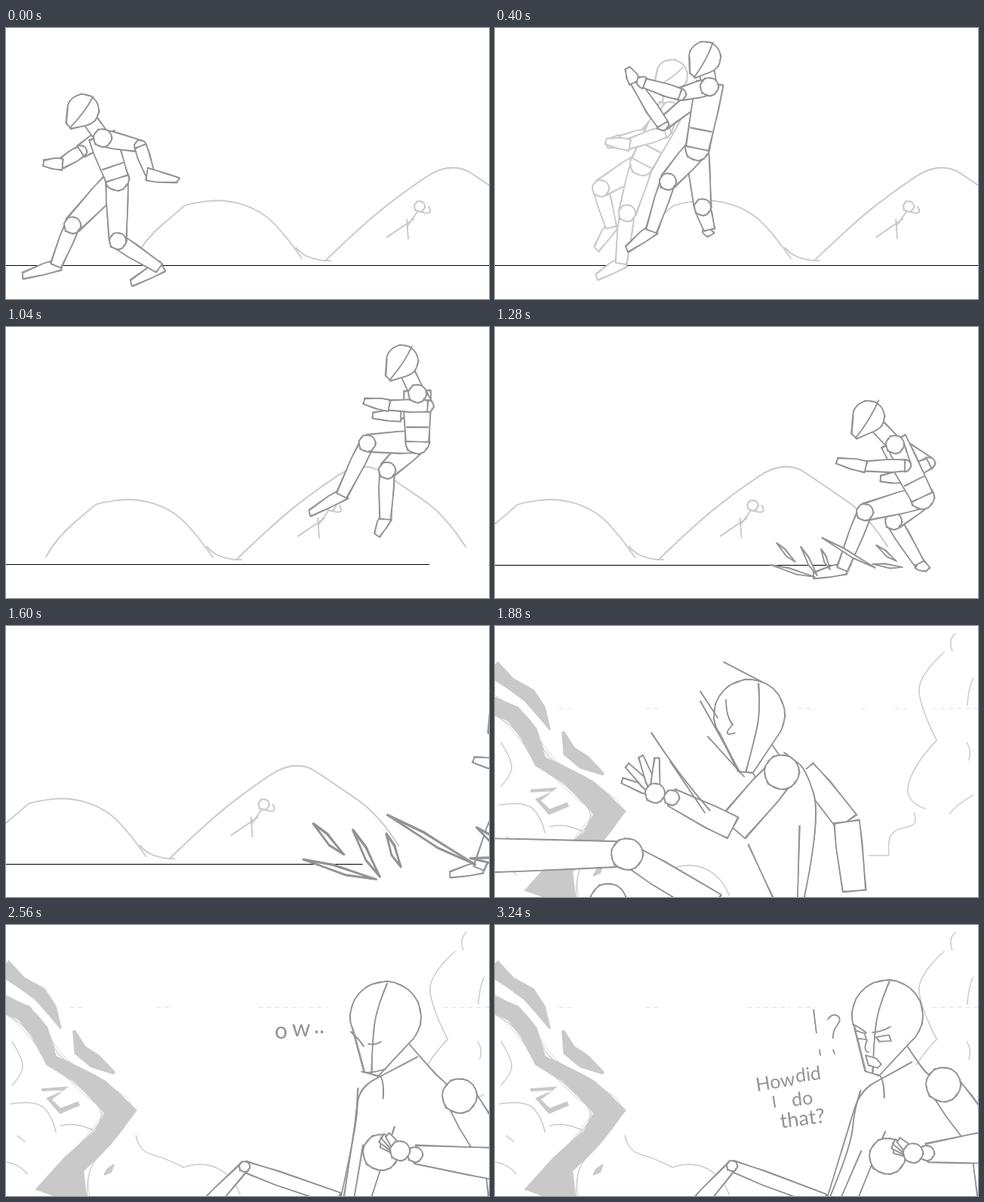
An HTML page with a canvas that plays this animation: 640x360 px, repeating every 3960 ms.

```html
<!DOCTYPE html>
<html lang="en">
<head>
<meta charset="utf-8">
<title>Backward leap sketch</title>
<style>
html, body { margin: 0; width: 100%; height: 100%; overflow: hidden; background: #fff; }
canvas { display: block; width: 640px; height: 360px; }
</style>
</head>
<body>
<canvas width="640" height="360"></canvas>
<script>
const ctx = document.querySelector('canvas').getContext('2d');
const LOOP = 3960, DARK = '#939393', LIGHT = '#c9c9c9';
const clamp = u => Math.max(0, Math.min(1, u));
const lerp = (a, b, u) => [a[0] + (b[0] - a[0]) * u, a[1] + (b[1] - a[1]) * u];
const mix = (p, q, u) => p.map((a, i) => lerp(a, q[i], u));
const pts = (...v) => v.flatMap((x, i) => i % 2 ? [] : [[x, v[i + 1]]]);
const side = (a, b, w, along = 0) => {
  const dx = b[0] - a[0], dy = b[1] - a[1], d = Math.hypot(dx, dy) || 1;
  return [a[0] - dy / d * w + dx * along, a[1] + dx / d * w + dy * along];
};

let pen = DARK, paper = '#fff', wide = 1.7;

function trace(p, closed, wob) {
  const q = p.map(([x, y], i) => [x + wob * Math.sin(i * 2.3 + 1), y + wob * Math.cos(i * 1.9 + p.length)]);
  ctx.beginPath();
  if (closed) {
    q.forEach(v => ctx.lineTo(...v));
    ctx.closePath();
    return;
  }
  ctx.moveTo(...q[0]);
  for (let i = 1; i < q.length - 1; i++) {
    const end = i === q.length - 2 ? q[i + 1] : lerp(q[i], q[i + 1], .5);
    ctx.quadraticCurveTo(...q[i], ...end);
  }
  if (q.length === 2) ctx.lineTo(...q[1]);
}
// Each outline is gone over twice, the second time a little off.
function ink(p, closed = false, rough = 1.3) {
  ctx.strokeStyle = pen;
  [[0, 1], [rough, .65]].forEach(([wob, k], i) => {
    trace(p, closed, wob);
    if (closed && !i && paper) { ctx.fillStyle = paper; ctx.fill(); }
    ctx.lineWidth = wide * k;
    ctx.stroke();
  });
}
const line = (...v) => ink(pts(...v), false, .6);

function ball([x, y], r) {
  ink(Array.from({ length: 18 }, (_, i) => {
    const a = i * Math.PI / 9;
    return [x + r * Math.cos(a), y + r * Math.sin(a)];
  }), true);
}
function limb(a, b, wa, wb) {
  const w = (wa + wb) / 2 + 1.5;
  ink([side(a, b, wa), side(a, b, w, .35), side(a, b, wb, 1),
    side(a, b, -wb, 1), side(a, b, -w, .35), side(a, b, -wa)], true);
}
function wedge(a, b, w) {
  ink([side(a, b, w, -.12), side(a, b, w, .3), side(a, b, w * .5, .95),
    side(a, b, -w * .4, 1), side(a, b, -w * .8, .4), side(a, b, -w, -.12)], true);
}
function skull(c, chin, r, jaw) {
  const dir = Math.atan2(chin[1] - c[1], chin[0] - c[0]), out = [];
  for (let a = .95; a < 5.4; a += .22) {
    out.push([c[0] + r * Math.cos(dir + a), c[1] + r * Math.sin(dir + a)]);
  }
  out.push(side(chin, c, jaw), side(chin, c, -jaw));
  ink(out, true);
}

// head, chin, shoulder, hip, far leg, near leg, far arm, near arm
const crouch = pts(102, 109, 83, 130, 128, 146, 147, 200, 88, 262, 66, 316, 21, 330, 148, 283, 203, 319, 165, 340,
  99, 164, 72, 181, 49, 180, 178, 157, 191, 195, 229, 202);
const push = pts(234, 63, 214, 74, 232, 110, 195, 180, 140, 213, 154, 265, 134, 295, 175, 246, 167, 313, 134, 332,
  200, 142, 165, 150, 148, 156, 225, 138, 175, 155, 146, 151);
const leap = pts(278, 39, 262, 63, 284, 78, 268, 160, 275, 238, 284, 268, 278, 275, 229, 204, 207, 270, 174, 295,
  222, 128, 184, 70, 175, 53, 245, 88, 197, 73, 188, 70);
const plant = pts(510, 87, 496, 105, 510, 122, 448, 193, 412, 248, 411, 317, 374, 320, 386, 198, 353, 254, 313, 266,
  455, 142, 430, 158, 407, 145, 466, 138, 430, 128, 408, 124);
const bound = pts(555, 47, 537, 67, 560, 97, 524, 155, 482, 199, 443, 273, 409, 309, 467, 139, 429, 202, 382, 242,
  505, 96, 500, 112, 460, 110, 574, 102, 521, 99, 495, 96);
const land = pts(495, 119, 476, 145, 530, 156, 566, 226, 528, 258, 562, 314, 574, 322, 490, 246, 460, 322, 421, 331,
  575, 181, 538, 200, 510, 202, 543, 184, 487, 185, 452, 178);

function body([head, chin, sh, hip, fk, fa, ft, nk, na, nt, fe, fw, ff, ne, nw, nf]) {
  const leg = (k, a, t) => {
    wedge(a, t, 8);
    limb(k, a, 10, 7);
    limb(hip, k, 15, 11);
    ball(k, 11);
  };
  const arm = (e, w, f) => {
    limb(sh, e, 11, 8);
    ball(e, 8);
    limb(e, w, 8, 6);
    wedge(w, f, 8);
  };
  leg(fk, fa, ft);
  arm(fe, fw, ff);
  limb(head, sh, 7, 10);
  leg(nk, na, nt);
  ball(hip, 16);
  limb(side(sh, hip, 0, -.06), hip, 18, 15);
  ink([side(hip, sh, 14, .3), side(hip, sh, -14, .3)]);
  arm(ne, nw, nf);
  ball(sh, 12);
  skull(head, chin, 21, 5);
  ink([side(head, chin, 2, -.75), side(head, chin, -4, 0), side(chin, head, 3)]);
}

// time, pose, easing to the next key, height of the arc
const keys = [
  [40, crouch, u => u * u, 0],
  [360, push, u => u, 0],
  [400, leap, u => 1 - (1 - u) ** 1.8, 28],
  [760, plant, u => u, 0],
  [800, bound, u => u, 38],
  [1280, land]
];
function runner(t) {
  if (t <= 40) return crouch;
  if (t >= 1280) return land;
  const i = keys.findIndex((k, j) => t < keys[j + 1][0]);
  const [t0, pose, ease, arc] = keys[i], [t1, next] = keys[i + 1];
  const u = ease((t - t0) / (t1 - t0)), lift = arc * 4 * u * (1 - u);
  return mix(pose, next, u).map(([x, y]) => [x, y - lift]);
}

function track() {
  pen = LIGHT;
  line(171, 305, 185, 280, 232, 240, 238, 234, 290, 227, 340, 243, 374, 280, 392, 306);
  line(384, 292, 398, 309, 430, 309);
  line(423, 309, 470, 264, 520, 223, 590, 175, 645, 212, 700, 250, 727, 292);
  ball([548, 237], 7);
  line(545, 244, 532, 263);
  line(548, 244, 568, 250, 560, 237);
  line(540, 254, 505, 278);
  line(531, 254, 533, 280);
  pen = DARK;
}

function sliver(x1, y1, x2, y2) {
  const a = [x1, y1], b = [x2, y2];
  ink([a, side(a, b, 3, .6), b, side(a, b, -2, .4)], true, .6);
}

function leapScene(t) {
  const cam = 14.75 * Math.max(0, Math.min(14, (t - 720) / 40));
  const slide = clamp((t - 1280) / 400) ** 2;
  ctx.save();
  ctx.translate(-cam, 0);
  ctx.fillStyle = '#000';
  ctx.fillRect(0, cam > 200 ? 316 : 315, 679, 1);
  track();
  ctx.restore();
  if ((t >= 320 && t <= 480) || (t >= 720 && t <= 880)) {
    pen = LIGHT;
    body(runner(t - 40));
    pen = DARK;
  }
  ctx.save();
  ctx.translate(260 * slide, 0);
  body(runner(t));
  ctx.restore();
  if (t < 1240) return;
  const s = 1 + (t - 1280) / 500;
  ctx.save();
  ctx.translate(470 + 150 * slide, 325);
  ctx.scale(s, s);
  ctx.translate(-470, -325);
  sliver(433, 280, 504, 320);
  sliver(373, 287, 398, 312);
  sliver(405, 292, 427, 330);
  sliver(365, 316, 424, 332);
  sliver(432, 295, 444, 322);
  sliver(505, 290, 532, 311);
  sliver(500, 315, 540, 319);
  ctx.restore();
}

// head, chin, neck, shoulder, elbow, wrist, palm, finger tip, far shoulder, far elbow, far wrist,
// knee, foot, hip, second knee, then the four trunk corners
const fall = pts(337, 118, 332, 194, 383, 168, 380, 194, 315, 268, 234, 228, 212, 222, 182, 176, 412, 190, 466, 260, 476, 352,
  175, 303, -40, 305, 290, 372, 150, 366, 432, 255, 408, 370, 372, 370, 336, 290);
const sit = pts(503, 122, 484, 198, 545, 175, 601, 227, 655, 318, 542, 305, 522, 300, 496, 282, 466, 217, 459, 290, 446, 370,
  316, 321, 262, 378, 440, 364, 497, 302, 465, 265, 442, 370, 640, 370, 630, 275);
const puzzled = pts(520, 120, 500, 197, 552, 182, 594, 212, 655, 295, 572, 303, 554, 303, 526, 290, 484, 220, 472, 295, 440, 370,
  314, 320, 262, 378, 436, 366, 520, 307, 468, 270, 438, 370, 640, 370, 630, 285);

function sitter(p, falling, open) {
  const [head, chin, neck, sh, elbow, wrist, palm, tip, fs, fe, fw, knee, foot, hip, knee2, a, b, c, d] = p;
  const farArm = () => { limb(fs, fe, 12, 16); limb(fe, fw, 17, 15); };
  if (falling > .5) farArm();
  ctx.fillStyle = paper;
  trace([neck, fs, a, b, c, d, sh], true, 0);
  ctx.fill();
  ink([neck, lerp(neck, fs, .4), fs, a, b]);
  ink([c, lerp(c, d, .5), d]);
  ink([lerp(a, d, .3), lerp(b, c, .2)]);
  if (falling <= .5) {
    ink([fs, lerp(fs, a, .5), fe, fw]);
    ink([side(fe, fw, -14), side(fe, fw, -14, 1)]);
  }
  limb(knee, hip, 7 + 7 * falling, 9 + 9 * falling);
  limb(foot, knee, 9 + 14 * falling, 7 + 10 * falling);
  ball(knee, 7 + 14 * falling);
  ball(knee2, 24);
  ink([head, lerp(neck, sh, .3), lerp(neck, sh, .7), sh]);
  ink([chin, lerp(chin, neck, .3), [chin[0] + 16, chin[1] + 32]]);
  limb(sh, elbow, 20, 21);
  limb(elbow, wrist, 22 - 6 * falling, 12);
  ball(sh, 23);
  ball(wrist, 10);
  // Four fingers fan out from the palm.
  const len = Math.hypot(tip[0] - palm[0], tip[1] - palm[1]);
  const dir = Math.atan2(tip[1] - palm[1], tip[0] - palm[0]);
  for (let i = 0; i < 4; i++) {
    const ang = dir + (i - 1.5) * (.2 + .22 * falling), r = len * (1 - .1 * Math.abs(i - 1.5));
    const end = [palm[0] + r * Math.cos(ang), palm[1] + r * Math.sin(ang)];
    limb(palm, end, 5, 3.5);
  }
  ball(palm, 13);
  skull(head, chin, 47, 10);
  const bulge = 9 * (1 - 2 * falling);
  ink([side(head, chin, bulge, -.55), side(head, chin, bulge * 1.6, -.1), side(head, chin, bulge, .45), chin]);
  const [x, y] = head;
  if (falling > .3) {
    line(x - 31, y - 20, x - 31, y + 2, x - 22, y + 13);
    line(x - 22, y + 13, x - 38, y + 30, x - 19, y + 24);
  } else if (!open) {
    line(x - 46, y + 20, x - 34, y + 31, x - 29, y + 39);
    line(x - 23, y + 36, x - 14, y + 38, x - 6, y + 33);
    line(x - 32, y + 73, x - 20, y + 76, x, y + 69);
  } else {
    line(x - 46, y + 12, x - 35, y + 17, x - 28, y + 23);
    line(x - 20, y + 23, x - 8, y + 22, x + 4, y + 15);
    ink(pts(x - 43, y + 20, x - 30, y + 24, x - 28, y + 32, x - 40, y + 31), true, .6);
    ink(pts(x - 15, y + 29, x + 2, y + 26, x + 5, y + 34, x - 11, y + 35), true, .6);
    line(x - 27, y + 33, x - 33, y + 47, x - 25, y + 49);
    ink(pts(x - 29, y + 53, x - 15, y + 57, x - 8, y + 65, x - 13, y + 70, x - 25, y + 66), true, .6);
  }
}

// A filled stream through x, y, half width.
function stream(...v) {
  const mid = [], half = [];
  for (let i = 0; i < v.length; i += 3) { mid.push([v[i], v[i + 1]]); half.push(v[i + 2]); }
  const edge = s => mid.map((p, i) => {
    const a = mid[Math.max(0, i - 1)], b = mid[Math.min(mid.length - 1, i + 1)];
    const q = side(a, b, half[i] * s);
    return [p[0] + q[0] - a[0], p[1] + q[1] - a[1]];
  });
  const left = edge(1), right = edge(-1);
  trace(left.concat(right.reverse()), true, 0);
  ctx.fillStyle = LIGHT;
  ctx.fill();
  return [left, right];
}

function backdrop() {
  pen = LIGHT;
  wide = 1.2;
  stream(-6, 104, 11, 24, 117, 12, 45, 142, 12, 60, 180, 9, 95, 199, 10, 122, 218, 15, 152, 248, 22, 128, 283, 14, 90, 318, 16, 74, 364, 37)
    .forEach(e => ink(e, false, 5));
  stream(-4, 56, 12, 20, 76, 8, 45, 92, 10, 60, 112, 8, 73, 138, 1);
  stream(90, 140, 2, 98, 166, 9, 118, 181, 10, 144, 197, 2);
  stream(47, 219, 2, 80, 217, 4, 57, 231, 4, 72, 247, 4, 97, 237, 3);
  stream(143, 318, 1, 137, 326, 4, 130, 332, 1);
  line(8, 155, 24, 180, 20, 200, 8, 213);
  line(5, 238, 40, 232, 62, 255, 66, 275);
  line(72, 267, 90, 261, 115, 272);
  line(172, 280, 176, 300, 212, 310, 235, 322);
  line(235, 322, 262, 313, 302, 335, 310, 358);
  line(0, 315, 18, 318, 28, 330);
  line(15, 280, 25, 288);
  line(610, 10, 600, 18, 606, 33);
  line(595, 35, 562, 65, 562, 105, 585, 152);
  line(585, 152, 558, 180, 540, 232, 570, 243);
  line(633, 70, 627, 85, 626, 105);
  line(625, 155, 632, 165, 628, 178);
  line(633, 225, 610, 238, 602, 250);
  line(555, 248, 562, 264, 530, 270, 520, 285, 522, 304);
  line(495, 305, 522, 305);
  ctx.strokeStyle = '#e0e0e0';
  ctx.lineWidth = 1;
  ctx.setLineDash([5, 6]);
  ctx.beginPath();
  for (const [x, len] of [[85, 17], [200, 20], [335, 57], [402, 23], [485, 11], [530, 15], [580, 60]]) {
    ctx.moveTo(x, 109.5);
    ctx.lineTo(x + len, 109.5);
  }
  ctx.stroke();
  ctx.setLineDash([]);
  pen = DARK;
  wide = 1.7;
}

function write(text, x, y, size, tilt = 0) {
  ctx.save();
  ctx.translate(x, y);
  ctx.rotate(tilt);
  ctx.fillStyle = DARK;
  ctx.font = `${size}px Lato, sans-serif`;
  ctx.fillText(text, 0, 0);
  ctx.restore();
}

function closeUp(t) {
  backdrop();
  if (t < 1760) return;
  const away = clamp((1880 - t) / 200);
  const settle = 1 - (1 - clamp((t - 1880) / 440)) ** 2;
  let pose = mix(fall, sit, settle);
  if (t >= 3000) pose = mix(sit, puzzled, t < 3160 ? .8 : 1);
  ctx.save();
  ctx.translate(-260 * away, -220 * away);
  sitter(pose, 1 - settle, t >= 3000);
  if (t < 1960) {
    line(303, 48, 355, 75);
    line(272, 87, 295, 122);
    line(272, 100, 292, 135, 325, 195);
    line(282, 147, 330, 200);
    line(207, 142, 245, 200, 285, 245);
    line(232, 180, 278, 248);
  }
  ctx.restore();
  if (t < 3000) {
    if (t >= 2400) write('o', 356, 151, 30);
    if (t >= 2480) write('w', 379, 148, 31);
    if (t >= 2560) write('..', 408, 144, 30);
  }
  if (t >= 3160) {
    line(422, 113, 424, 128, 426, 143);
    line(441, 125, 447, 117, 460, 124, 447, 142, 448, 150);
    line(430, 166, 431, 173);
    line(448, 166, 450, 171);
  }
  if (t >= 3240) {
    write('How', 347, 221, 25, -.16);
    write('did', 399, 209, 25, -.12);
    write('I', 368, 243, 22, -.15);
    write('do', 394, 241, 25, -.12);
    write('that?', 379, 270, 27, -.13);
  }
}

// Drawings are held on ones or twos.
function hold(t) {
  if (t < 80) return 0;
  const late = [3240, 3160, 3000, 2560].find(s => t >= s);
  if (late) return late;
  const twos = (t >= 1880 && t < 2200) || t >= 2320 || (t >= 1680 && t < 1760);
  const base = [2320, 1880, 1680, 0].find(s => t >= s), step = twos ? 80 : 40;
  return base + Math.floor((t - base) / step) * step;
}

function draw(t) {
  ctx.fillStyle = '#fff';
  ctx.fillRect(0, 0, 640, 360);
  ctx.lineCap = ctx.lineJoin = 'round';
  (t < 1680 ? leapScene : closeUp)(t);
}

let start;
function frame(now) {
  if (start === undefined) start = now;
  draw(hold((now - start) % LOOP));
  requestAnimationFrame(frame);
}
draw(0);
requestAnimationFrame(frame);
</script>
</body>
</html>
```
